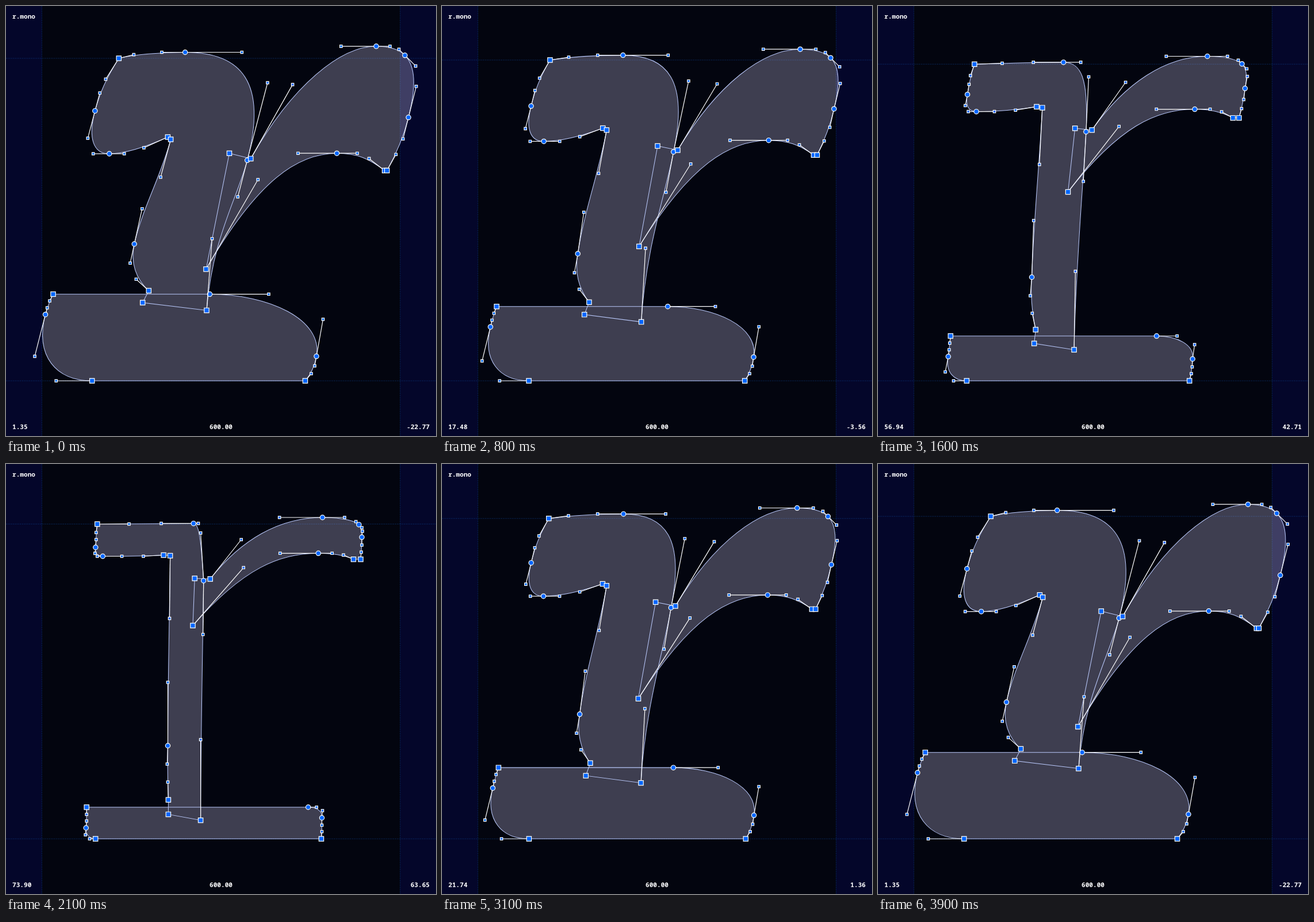
An HTML page with a canvas for the animation above (4000 ms loop, 748 px wide and 748 px high).

```html
<!DOCTYPE html>
<html lang="en">
<head>
<meta charset="utf-8">
<title>r.mono</title>
<style>
  html, body { margin: 0; width: 100%; height: 100%; overflow: hidden; background: #03050f; }
  canvas { display: block; width: 748px; height: 748px; }
</style>
</head>
<body>
<canvas id="stage" width="748" height="748"></canvas>
<script>
const ctx = document.getElementById('stage').getContext('2d');
const SIZE = 748, LEFT = 62.33, RIGHT = 685.67, BASE = 652;
const FRAME = 100, FRAMES = 40;

// Outline points: kind (c corner, s smooth, h handle), heavy x y, light x y
const parse = text => text.trim().split(/\s*;\s*/).map(row => {
  const [kind, ...n] = row.split(' ');
  return { kind, n: n.map(Number) };
});

const foot = parse(`c 82 501.3 140.2 597; s 354.5 501.3 525.7 597; h 457 501.3 540.2 597;
  h 551.5 545 550.5 603; s 540 609.3 549.5 615.5; h 537 626 549.5 628.3;
  h 531 639.5 549.5 639.5; c 520.5 652 548.5 652; c 149.7 652 155.7 652;
  h 87.2 652 145.5 652; h 50 609.4 138.2 645; s 68.5 536.7 139.2 633;
  h 71.7 525 140.2 621; h 76 513 140.2 609.5`);

const stem = parse(`c 196.3 91 158.8 104.5; h 222.3 84.6 214 104.4; h 271 80.5 270 103.4;
  s 311.6 80.5 326.2 103.4; h 410.3 80.5 334.5 103.4; h 455 133.5 338.6 120;
  s 419.7 268.3 343.7 203; h 403.2 332 342.7 296.5; h 358.5 404.7 338.6 479.5;
  c 349 529.4 338.6 619.7; c 237.7 516 282.4 609.4; c 248.3 495.3 282.4 584.3;
  h 226.4 475.3 281.5 553.3; h 216 447.3 280.4 522; s 223.2 414 281.5 490;
  h 236.8 352.7 281.5 379.8; h 269 297.7 284.5 268.6; c 286.6 232 285.6 159.5;
  c 281.4 228 274.2 158.5; h 239.9 246.6 239 160.5; h 205.7 257 201.5 160.5;
  s 179.7 257 168.3 160.5; h 151.7 257 158.8 160.5; h 142.3 230 154.8 155.4;
  s 154.8 182.4 155.8 145; h 163.2 151.3 156.8 131.5; h 173.4 127.4 156.8 119.2`);

const arm = parse(`c 388.5 256.3 328.2 199; c 425.8 265.4 355.2 200; h 498.6 136.6 409.2 131.5;
  h 582.8 70.1 475.7 93; s 644 70.1 550.5 93; h 668 70.1 589 93;
  h 683.5 75.4 608.7 100.3; s 693.9 85.8 613.9 105.4; h 712.6 104.4 619 110.7;
  h 713.6 139.8 620 117; s 700.1 193.8 619 127.3; h 690.7 231.2 619 141;
  h 678.3 258.2 618 153.3; c 662.7 286.2 617 165.7; c 658.6 286.2 604.5 165.7;
  h 631.6 265.4 587 158.4; h 611 256.2 567.2 155.3; s 575.5 256.2 543.3 155.3;
  h 508 256.2 476.8 155.3; h 438.3 302 413.2 180.3; c 348 457.7 325 281`);

const contours = [foot, stem, arm];

// Sine ease-in on a ping-pong loop, bent once by the weight axis mapping
function weight(i) {
  const a = 1 - Math.cos(Math.PI / 2 * i / (FRAMES / 2));
  return Math.min(1.17 * a, 0.0402 + 1.0415 * a);
}

// Side bearings: step, left, right
const bearings = [[0, 1.35, -22.77], [1, 1.35, -22.77], [8, 17.48, -3.56], [9, 21.74, 1.36],
  [13, 40.84, 23.56], [16, 56.94, 42.71], [19, 73.90, 63.65]];

function bearing(s, side) {
  let k = 1;
  while (k < bearings.length - 1 && weight(bearings[k][0]) < s) k++;
  const a = bearings[k - 1], b = bearings[k];
  const wa = weight(a[0]), wb = weight(b[0]);
  return (a[side] + (b[side] - a[side]) * (s - wa) / (wb - wa)).toFixed(2);
}

const pose = (contour, s) => contour.map(({ kind, n: [x, y, u, v] }) =>
  ({ kind, x: x + (u - x) * s, y: y + (v - y) * s }));

function trace(pts) {
  const at = i => pts[i % pts.length];
  ctx.moveTo(pts[0].x, pts[0].y);
  for (let i = 1; i <= pts.length; i++) {
    const p = at(i);
    if (p.kind === 'h') {
      const q = at(i + 1), r = at(i + 2);
      ctx.bezierCurveTo(p.x, p.y, q.x, q.y, r.x, r.y);
      i += 2;
    } else {
      ctx.lineTo(p.x, p.y);
    }
  }
  ctx.closePath();
}

function line(x1, y1, x2, y2) {
  ctx.beginPath();
  ctx.moveTo(x1, y1);
  ctx.lineTo(x2, y2);
  ctx.stroke();
}

function node({ kind, x, y }) {
  const r = kind === 'h' ? 2.2 : 4.15;
  ctx.beginPath();
  if (kind === 's') ctx.arc(x, y, r, 0, Math.PI * 2);
  else ctx.rect(x - r, y - r, r * 2, r * 2);
  ctx.fill();
  ctx.stroke();
}

function drawHandles(pts) {
  const count = pts.length;
  ctx.strokeStyle = '#fff';
  ctx.fillStyle = '#06f';
  ctx.lineWidth = 1.2;
  pts.forEach((p, i) => {
    if (p.kind === 'h') return;
    for (const q of [pts[(i + 1) % count], pts[(i + count - 1) % count]]) {
      if (q.kind === 'h') line(p.x, p.y, q.x, q.y);
    }
  });
  for (let i = count - 1; i >= 0; i--) node(pts[i]);
}

function label(text, x, y, align) {
  ctx.textAlign = align;
  ctx.fillText(text, x, y);
}

function draw(frame) {
  const s = weight(Math.min(frame, FRAMES - frame));
  const top = 91 + 13.4 * s;

  ctx.fillStyle = '#03050f';
  ctx.fillRect(0, 0, SIZE, SIZE);
  ctx.fillStyle = '#04062a';
  ctx.fillRect(0, 0, LEFT, SIZE);
  ctx.fillRect(RIGHT, 0, SIZE - RIGHT, SIZE);

  ctx.strokeStyle = '#0c4090';
  ctx.lineWidth = 1;
  ctx.setLineDash([1.04, 2.08]);
  line(LEFT, 0, LEFT, SIZE);
  line(RIGHT, 0, RIGHT, SIZE);
  line(0, top, SIZE, top);
  line(0, BASE, SIZE, BASE);
  ctx.setLineDash([]);

  const shapes = contours.map(c => pose(c, s));
  ctx.beginPath();
  shapes.forEach(trace);
  ctx.fillStyle = 'rgba(221, 215, 255, 0.27)';
  ctx.fill();
  ctx.strokeStyle = '#b9c8fa';
  ctx.lineWidth = 1.04;
  ctx.stroke();
  shapes.forEach(drawHandles);

  ctx.fillStyle = '#fff';
  ctx.font = 'bold 11.1px "Noto Sans Mono", "DejaVu Sans Mono", monospace';
  label('r.mono', 11, 21.5, 'left');
  label(bearing(s, 1), 11, 736.3, 'left');
  label('600.00', 374, 736.3, 'center');
  label(bearing(s, 2), 737, 736.3, 'right');
}

const start = performance.now();
let shown = -1;
function tick() {
  const frame = Math.floor((performance.now() - start) / FRAME) % FRAMES;
  if (frame !== shown) draw(shown = frame);
  requestAnimationFrame(tick);
}
tick();
</script>
</body>
</html>
```
